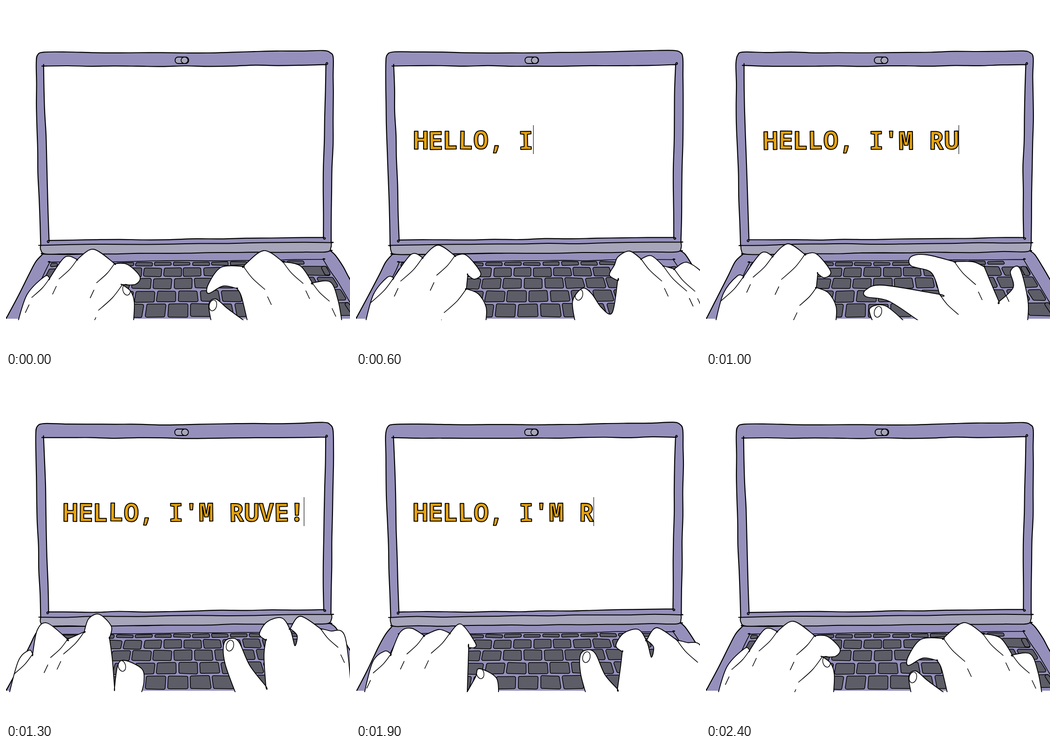
An HTML page with a canvas for the animation above (2.5 s loop, 748 px wide and 748 px high).

```html
<!DOCTYPE html>
<html lang="en">
<head>
<meta charset="utf-8">
<title>Typing on a laptop</title>
<style>
html, body { margin: 0; width: 100%; height: 100%; overflow: hidden; background: #fff; }
canvas { display: block; width: 100vw; height: 100vh; }
</style>
</head>
<body>
<canvas id="stage" width="748" height="748"></canvas>
<script>
const ctx = document.getElementById('stage').getContext('2d');
const PURPLE = '#9590bb', GREY = '#a7a5b9', KEY = '#5d5d67', GOLD = '#e6a30c';
const STEP = 100, STEPS = 25;
const MESSAGE = "HELLO, I'M RUVE!";
const LETTERS = MESSAGE.replace(/ /g, '').length;
const PITCH = 32.8, TEXT_X = 124, BASELINE = 311.5;

// Outlines run from wrist to wrist. "|" marks a corner, "!" a corner with a crease below it.
const hand = (side, nail, outline) => ({ side, nail, pts: parse(outline) });
const shifted = (h, dx, dy) => ({ ...h, dx, dy });

const LEFT = [
  hand(-1, [262, 617], '25,690 46,627 84,588 95,592! 128,546 155,551! 190,529 236,560! 264,562 291,588 282,605 253,606! 271,620 279,645 277,690'),
  hand(-1, null, '20,690 38,627 68,590 82,591! 120,540 145,547! 178,520 215,543! 240,542 271,580 258,594 243,585| 240,615! 266,626 283,655 282,690'),
  hand(-1, [252, 626], '6,690 27,615 50,592 58,600! 68,548 90,533 134,568! 170,552! 180,523 203,514 229,540 225,566| 231,610 236,673| 243,625 258,614 295,632 300,660 293,690'),
  hand(-1, [270, 642], '17,690 36,618 62,594 76,600! 96,553 120,544 148,560! 180,547 204,555! 228,535 259,575 258,586 245,586| 242,682| 260,650 268,632 305,652 310,690')
];
const RIGHT = [
  hand(1, [450, 651], '447,690 441,649 456,637 482,658 516,683| 526,690| 512,632 502,614| 472,609 440,625 440,605 468,568 516,566! 560,532 602,556! 640,565 666,602! 705,600 722,640 731,690'),
  hand(1, [485, 628], '477,690 471,642 492,614 512,625 533,655 557,667 569,597| 551,585 562,563 570,545 595,533 620,550! 642,543 668,565! 692,572! 722,558 765,600 765,690'),
  hand(1, [374, 665], '364,690 356,658 390,652 436,690| 470,690| 398,642 348,632 348,617 385,607 508,627! 490,580 446,565 446,545 480,541 540,556! 580,556 605,567! 620,603 637,643| 668,612 662,577 682,570 700,640 699,690'),
  hand(1, [487, 582], '501,690 476,620 474,577 490,566 507,575 530,625 565,670| 561,605 565,570| 551,557 568,530 600,522 619,550 628,582 633,560 618,545| 640,518 684,545! 705,550 737,562 752,690')
];
const POSES = [
  [LEFT[0], RIGHT[0]],
  [LEFT[1], RIGHT[1]],
  [shifted(LEFT[1], 0, -3), RIGHT[2]],
  [LEFT[2], RIGHT[3]],
  [LEFT[3], shifted(RIGHT[3], 14, 25)]
];
const POSE_STARTS = [3, 9, 12, 15, 24];

let look = 0;
// Wobble that depends on place and drawing only, so that shared corners stay joined.
function shake(x, y, amount = 1) {
  const v = Math.sin(x * 12.99 + y * 78.23 + look * 37.7) * 4375.5;
  return ((v - Math.floor(v)) * 2 - 1) * amount;
}
const shaken = ([x, y]) => [x + shake(x, y), y + shake(y, x)];

function parse(text) {
  return text.split(' ').flatMap(item => {
    const [x, y] = item.split(',').map(parseFloat);
    const p = [x, y];
    p.crease = item.endsWith('!');
    return /[!|]$/.test(item) ? [p, [x, y]] : [p];
  });
}

// Smooth curve through all points; a repeated point makes a corner.
function curve(pts) {
  const at = i => pts[Math.max(0, Math.min(pts.length - 1, i))];
  ctx.beginPath();
  ctx.moveTo(...pts[0]);
  for (let i = 0; i < pts.length - 1; i++) {
    const [a, b, c, d] = [at(i - 1), at(i), at(i + 1), at(i + 2)];
    ctx.bezierCurveTo(b[0] + (c[0] - a[0]) / 6, b[1] + (c[1] - a[1]) / 6,
                      c[0] - (d[0] - b[0]) / 6, c[1] - (d[1] - b[1]) / 6, c[0], c[1]);
  }
}

function rough(pts) {
  const out = [shaken(pts[0])];
  for (let i = 1; i < pts.length; i++) {
    const [[ax, ay], [bx, by]] = [pts[i - 1], pts[i]];
    const n = Math.ceil(Math.hypot(bx - ax, by - ay) / 60) || 1;
    for (let k = 1; k <= n; k++)
      out.push(shaken([ax + (bx - ax) * k / n, ay + (by - ay) * k / n]));
  }
  return out;
}

function paint(fill, width) {
  if (fill) { ctx.fillStyle = fill; ctx.fill(); }
  ctx.lineWidth = width;
  ctx.stroke();
}

function sketch(outline, fill, width = 2.2) {
  curve(rough(parse(outline)));
  paint(fill, width);
}

function clipped(height, drawInside) {
  ctx.save();
  ctx.beginPath();
  ctx.rect(0, 0, 748, height);
  ctx.clip();
  drawInside();
  ctx.restore();
}

function drawKey(left, right, top, height) {
  const lean = (x, y) => x + (x - 380) * 0.0018 * y;
  const c = [[left, -0.5], [right, -0.5], [right, 0.5], [left, 0.5]]
    .map(([x, v]) => shaken([lean(x, v * height), top + (v + 0.5) * height]));
  const r = Math.min(3.5, height / 3);
  ctx.beginPath();
  ctx.moveTo((c[0][0] + c[1][0]) / 2, (c[0][1] + c[1][1]) / 2);
  for (let i = 1; i <= 4; i++) ctx.arcTo(...c[i % 4], ...c[(i + 1) % 4], r);
  ctx.closePath();
  paint(KEY, 1.5);
}

// Rows grow towards the viewer; each has a top, a height and the centre of one key.
function drawKeys() {
  const rows = [[557, 7, 300], [569, 19, 362], [592, 22, 385], [619, 24, 396], [648, 28, 374]];
  rows.forEach(([top, height, centre], i) => {
    const depth = top + height / 2 - 557;
    const pitch = 41.3 + 1.9 * i, width = pitch * 0.88;
    const min = 99 - depth * 0.48, max = 688 + depth * 0.63;
    for (let n = -8; n <= 8; n++) {
      const x = centre + n * pitch;
      const left = Math.max(min, x - width / 2);
      const right = max - x - width / 2 < 30 ? max : x + width / 2;
      if (right - left > 10) drawKey(left, right, top + (380 - x) * 0.008, height);
    }
  });
}

function drawLaptop() {
  clipped(680, () => {
    sketch('0,682 50,584 64,556 80,540| 705,533| 716,541 748,592 800,682', PURPLE);
    sketch('40,672 86,576 95,557| 690,551| 722,602 770,682', null, 1.6);
    drawKeys();
  });
  sketch('75,522 67,260 65,125 68,107 82,100 390,102 690,97 705,101 711,113 712,190 707,516', PURPLE);
  sketch('75,520| 707,514| 707,524 698,534 390,537 85,540 76,531 75,520|', GREY, 2);
  sketch('82,130| 390,131 695,128| 690,350 690,503| 300,508 93,509| 88,330 82,130|', '#fff');

  ctx.beginPath();
  ctx.roundRect(367 + shake(1, 2), 111, 29.5, 14, 6.5);
  paint(GREY, 1.8);
  ctx.beginPath();
  ctx.ellipse(388.5 + shake(3, 4), 118, 7.5, 7, 0, 0, 7);
  paint(GREY, 1.6);
}

function drawHand({ side, nail, pts, dx = 0, dy = 0 }, press) {
  // Movement fades out towards the wrist.
  const move = ([x, y]) => {
    const k = Math.max(0, Math.min(1, (690 - y) / 80));
    return [x + dx * k, y + (dy + press) * k];
  };
  curve(pts.map(move));
  paint('#fff', 1.8);
  ctx.clip();
  for (const p of pts.filter(p => p.crease)) {
    const [x, y] = move(p);
    const len = 65 + shake(p[0], p[1], 12);
    const end = [x + side * 0.68 * len, y + 0.73 * len];
    curve([[x, y], [x + side * len * 0.28, y + len * 0.37], end]);
    paint(null, 1.5);
    curve([[end[0] + side * 6, end[1] + 16], [end[0] + side * 14, end[1] + 33]]);
    paint(null, 1.5);
  }
  if (nail) {
    ctx.beginPath();
    ctx.ellipse(...move(nail), 8, 12, side * 0.25, 0, 7);
    paint(null, 1.4);
  }
}

// Typing adds one letter per step, deleting removes two; spaces take no time.
function typed(step) {
  let left = step === 0 ? 0
    : step < 18 ? Math.min(step + 1, LETTERS)
    : LETTERS - 2 * (step - 17);
  let i = 0;
  while (left > 0) if (MESSAGE[i++] !== ' ') left--;
  return MESSAGE.slice(0, i);
}

function drawText(text) {
  if (!text) return;
  ctx.font = '700 54.7px "Noto Sans Mono", "DejaVu Sans Mono", monospace';
  ctx.textAlign = 'center';
  ctx.fillStyle = GOLD;
  ctx.lineWidth = 2;
  [...text].forEach((ch, i) => {
    ctx.save();
    ctx.translate(TEXT_X + (i + 0.5) * PITCH + shake(i, 5, 0.5), BASELINE + shake(i, 6, 0.7));
    ctx.rotate(shake(i, 7, 0.02));
    ctx.fillText(ch, 0, 0);
    ctx.strokeText(ch, 0, 0);
    ctx.restore();
  });
  const x = TEXT_X + text.length * PITCH - 0.7;
  ctx.beginPath();
  ctx.moveTo(x, 259.5);
  ctx.lineTo(x, 321.5);
  paint(null, 1.1);
}

function draw(step) {
  look = step === 17 ? 16 : step % 24;
  ctx.fillStyle = '#fff';
  ctx.fillRect(0, 0, 748, 748);
  ctx.strokeStyle = '#000';
  ctx.lineJoin = ctx.lineCap = 'round';
  drawLaptop();
  drawText(typed(step));
  const pose = POSE_STARTS.filter(start => step >= start).length % POSES.length;
  const press = 2 * ((look < 9 ? look : look - 1) % 3);
  for (const h of POSES[pose]) clipped(683, () => drawHand(h, press));
}

let last = -1;
function tick(now) {
  const step = Math.floor(now / STEP) % STEPS;
  if (step !== last) draw(last = step);
  requestAnimationFrame(tick);
}
draw(0);
requestAnimationFrame(tick);
</script>
</body>
</html>
```
